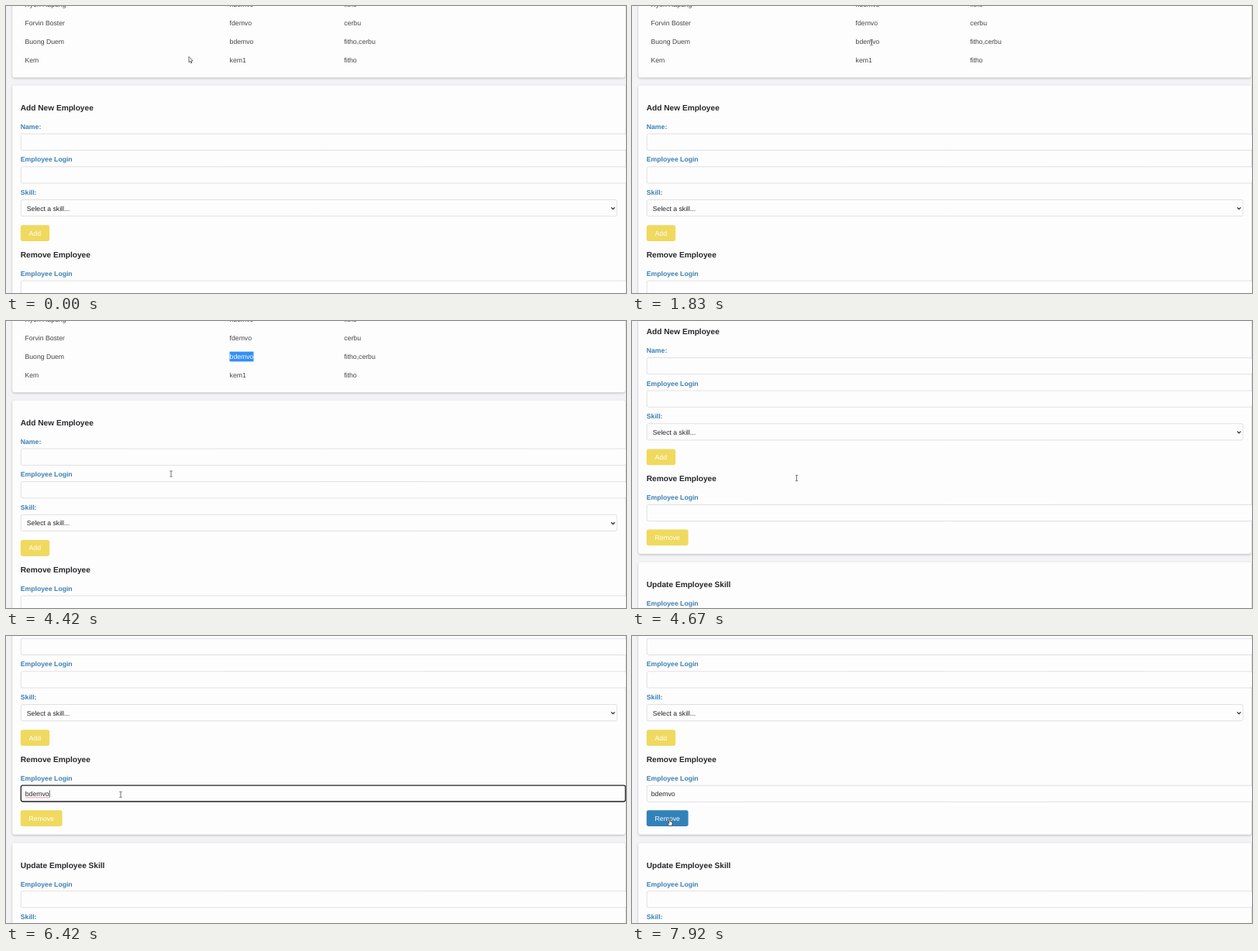
An HTML page with a canvas for the animation above (8000 ms loop, 800 by 371 pixels).

```html
<!DOCTYPE html>
<html lang="en">
<head>
<meta charset="utf-8">
<title>Employee admin</title>
<style>
  html, body { margin: 0; width: 100%; height: 100%; overflow: hidden; background: #f3f2f4; }
  canvas { display: block; }
</style>
</head>
<body>
<canvas id="stage" width="800" height="371"></canvas>
<script>
const ctx = document.getElementById('stage').getContext('2d');
ctx.textRendering = 'geometricPrecision';

const LOOP = 8000;
const FAMILY = '"Liberation Sans", Arial, sans-serif';
const BODY = `8.66px ${FAMILY}`;
const LABEL = `bold 8.66px ${FAMILY}`;
const HEADING = `bold 10.13px ${FAMILY}`;
const YELLOW = [240, 217, 95], BLUE = [50, 130, 184];
const LEFT = 18.8;
const LOGIN = 'bdemvo';

// Moments of the interaction, in ms
const SELECT = 1900, SCROLL = [4415, 4805], FOCUS = 5500, PASTE = 6100, HOVER = 7010, BLUR = 7700;

const rows = [
  ['Hyen Hapung', 'hbemvo', 'fitho'],
  ['Forvin Boster', 'fdemvo', 'cerbu'],
  ['Buong Duem', LOGIN, 'fitho,cerbu'],
  ['Kem', 'kem1', 'fitho']
];

// Pointer path: time, x, y
const path = [
  [0, 236, 65.5], [300, 236, 65.5], [920, 283.5, 43], [1500, 309, 47], [3420, 309, 47],
  [4250, 213, 197.5], [4500, 213, 197.5], [4830, 212, 208], [5080, 212, 208],
  [5500, 148, 205], [6420, 148, 205], [6660, 97, 207], [7300, 48.5, 236.5], [LOOP, 48.5, 236.5]
];
const shapes = [[0, arrow], [1050, beam], [3600, arrow], [4050, beam], [6850, arrow], [HOVER, hand]];

function ease(t, from, to) {
  const u = Math.min(1, Math.max(0, (t - from) / (to - from)));
  return u * u * (3 - 2 * u);
}

const mix = (a, b, u) => a + (b - a) * u;

function text(str, x, y, font, color) {
  ctx.font = font;
  ctx.fillStyle = color;
  ctx.fillText(str, x, y);
}

function box(x, y, w, h, r, fill, stroke, width = 1) {
  ctx.beginPath();
  ctx.roundRect(x, y, w, h, r);
  ctx.fillStyle = fill;
  ctx.fill();
  if (stroke) {
    ctx.strokeStyle = stroke;
    ctx.lineWidth = width;
    ctx.stroke();
  }
}

function line(points, color, width) {
  ctx.beginPath();
  points.forEach(([x, y]) => ctx.lineTo(x, y));
  ctx.strokeStyle = color;
  ctx.lineWidth = width;
  ctx.stroke();
}

function card(top, bottom) {
  ctx.save();
  ctx.shadowColor = 'rgba(0, 0, 0, .24)';
  ctx.shadowBlur = 3;
  ctx.shadowOffsetY = 1;
  box(8.2, top, 791, bottom - top, 3, '#fefdfe');
  ctx.restore();
}

const heading = (str, y) => text(str, LEFT, y, HEADING, '#26262a');
const label = (str, y) => text(str, LEFT, y, LABEL, '#3a80b2');
const field = (y, right = 800.4) => box(19.2, y, right - 19.2, 21.2, 2.2, '#fefdfe', '#d6d6da', 0.75);

function button(str, y, width, color) {
  box(LEFT, y, width, 20.8, 2.7, `rgb(${color})`);
  text(str, LEFT + 10.8, y + 13.4, BODY, '#fff');
}

function table(t) {
  rows.forEach(([name, login, skills], i) => {
    const y = 1.4 + i * 23.8;
    const selected = login === LOGIN && t >= SELECT;
    if (selected) box(288.5, 39.7, 31, 12.8, 0, '#3390f5');
    text(name, 24.5, y, BODY, '#444');
    text(login, 288.6, y, BODY, selected ? '#fff' : '#444');
    text(skills, 436.3, y, BODY, '#444');
  });
}

function removeField(t) {
  const focused = t >= FOCUS && t < BLUR;
  const pasted = t >= PASTE;
  field(355.2);
  if (focused) box(19.3, 355.1, 780, 20.9, 2.4, '#fefdfe', '#26262a', 1.3);
  if (pasted) text(LOGIN, 24.8, 368.9, BODY, '#222');
  if (!focused) return;
  if (pasted) {
    const squiggle = Array.from({ length: 32 }, (_, i) => [25 + i, 370.5 + (i % 2) * 0.7]);
    line(squiggle, '#d66', 0.6);
  }
  if ((t - (pasted ? PASTE : FOCUS)) % 1060 < 530) {
    const x = pasted ? 56.3 : 25;
    line([[x, 361.4], [x, 370.6]], '#222', 0.7);
  }
}

function page(t) {
  card(-40, 92.4);
  table(t);

  card(102.6, 418.8);
  heading('Add New Employee', 134.9);
  label('Name:', 158.7);
  field(165.3);
  label('Employee Login', 201.4);
  field(207.8);
  label('Skill:', 244.1);
  field(250.5, 788.3);
  text('Select a skill...', 26.8, 264.6, BODY, '#222');
  line([[780.9, 260.4], [783.2, 262.7], [785.5, 260.4]], '#222', 1.2);
  button('Add', 283.2, 37.4, YELLOW);

  heading('Remove Employee', 324.9);
  label('Employee Login', 348.9);
  removeField(t);
  const hover = ease(t, HOVER, HOVER + 160);
  button('Remove', 387.2, 53.8, YELLOW.map((c, i) => Math.round(mix(c, BLUE[i], hover))));

  card(429.6, 600);
  heading('Update Employee Skill', 461.8);
  label('Employee Login', 485.5);
  field(491.8);
  label('Skill:', 528.3);
}

function outline(points, fill, stroke) {
  ctx.beginPath();
  points.forEach(([x, y]) => ctx.lineTo(x, y));
  ctx.closePath();
  ctx.fillStyle = fill;
  ctx.fill();
  ctx.strokeStyle = stroke;
  ctx.lineWidth = 0.8;
  ctx.stroke();
}

function arrow() {
  outline([[0, 0], [0, 7.4], [1.7, 5.9], [2.8, 8.4], [3.9, 7.9], [2.8, 5.5], [5, 5.3]], '#fff', '#444');
}

function beam() {
  line([[-1.8, -3.6], [1.8, -3.6]], '#666', 0.8);
  line([[0, -3.6], [0, 3.6]], '#666', 0.9);
  line([[-1.8, 3.6], [1.8, 3.6]], '#666', 0.8);
}

function hand() {
  outline([[-0.8, 0], [0.5, 0], [0.6, 3], [3.6, 4], [3.6, 6.6], [2.7, 9], [-0.8, 9],
    [-2.8, 5.6], [-2.2, 5], [-0.8, 6]], '#fff', '#333');
}

function pointer(t) {
  const i = path.findIndex(([time]) => time > t);
  const [t0, x0, y0] = path[i - 1];
  const [t1, x1, y1] = path[i];
  const u = ease(t, t0, t1);
  ctx.save();
  ctx.translate(mix(x0, x1, u), mix(y0, y1, u));
  shapes.findLast(([time]) => time <= t)[1]();
  ctx.restore();
}

function draw(now) {
  const t = now % LOOP;
  ctx.fillStyle = '#f3f2f4';
  ctx.fillRect(0, 0, 800, 371);
  ctx.save();
  ctx.translate(0, -162 * ease(t, ...SCROLL));
  page(t);
  ctx.restore();
  pointer(t);
}

const start = performance.now();
function tick() {
  draw(performance.now() - start);
  requestAnimationFrame(tick);
}
tick();
</script>
</body>
</html>
```
